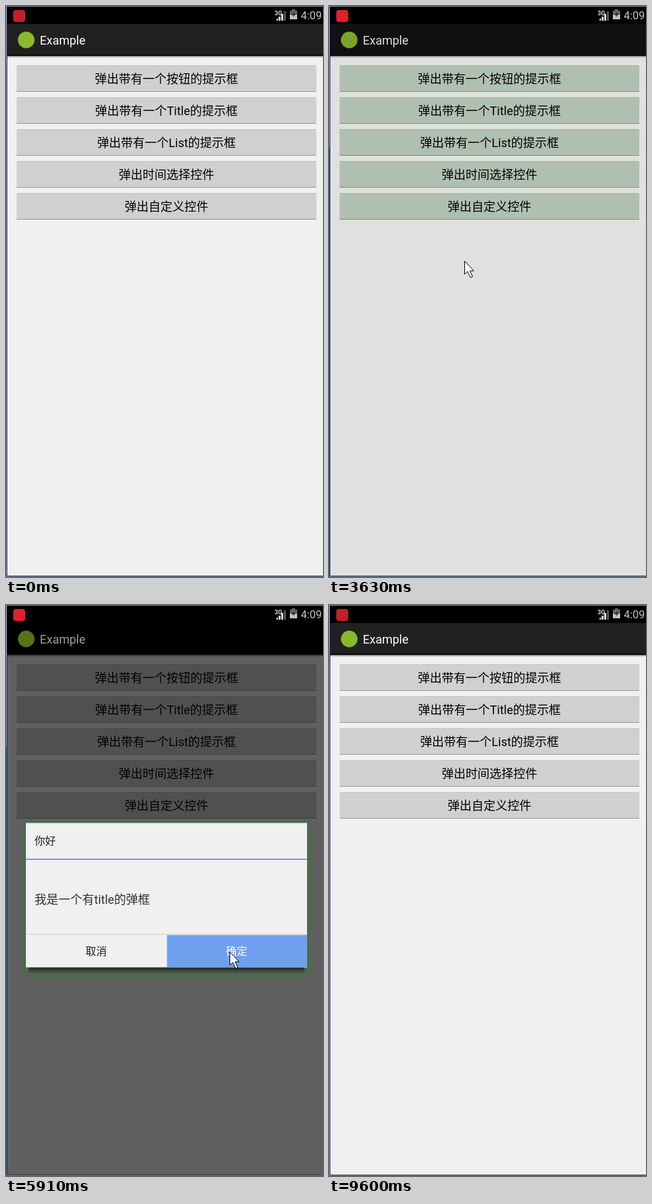
An HTML page that plays this animation: 478x858 px, repeating every 9.65 s.

```html
<!DOCTYPE html>
<html lang="zh-CN">
<head>
<meta charset="utf-8">
<style>
html, body { margin: 0; width: 100%; height: 100%; overflow: hidden; background: #000 }
svg { display: block; width: 478px; height: 858px; font: 18px Roboto, "Noto Sans CJK SC", "Noto Sans CJK", sans-serif }
.mid { text-anchor: middle }
.small { font-size: 16px }
</style>
</head>
<body>
<svg viewBox="0 0 478 858">
  <defs>
    <linearGradient id="shade" x2="0" y2="1">
      <stop stop-opacity=".65"/><stop offset="1" stop-opacity="0"/>
    </linearGradient>
  </defs>

  <rect id="page" x="2" y="75" width="476" height="781"/>
  <rect x="2" y="75" width="476" height="3" fill="url(#shade)" opacity=".7"/>
  <g id="buttons"></g>

  <!-- action bar -->
  <rect id="bar" x="2" y="27" width="476" height="46"/>
  <path d="M2 73h476v2H2z" fill="#0c0606"/>
  <g id="brand">
    <circle cx="30.5" cy="51" r="12.5" fill="#8aba2c"/>
    <text x="51" y="58" fill="#fff">Example</text>
  </g>

  <!-- status bar -->
  <path d="M2 1h476v26H2z"/>
  <rect id="badge" x="11" y="6" width="18" height="18" rx="4"/>
  <text x="405" y="14" font-size="9" font-weight="700" fill="#ddd">3G</text>
  <path d="M408 19h2v3h-2zM411 16h3v6h-3zM415 12h3v10h-3z" fill="#ddd"/>
  <path d="M419 8h3v14h-3z" fill="#555"/>
  <path d="M431 5h5v2h3v13h-11V7h3z" fill="#666"/>
  <path d="M428 13h11v7h-11z" fill="#c4c4c4"/>
  <path d="M436 8l-6 6h4l-2 4 5-6h-3z" fill="#222"/>
  <text x="444.5" y="20" font-size="16.5" fill="#c4c4c4">4:09</text>

  <!-- window edge -->
  <path d="M0 0h478v1H0z" fill="#7893b3"/>
  <path d="M0 0h1v858H0z" fill="#8fadcb"/>
  <path d="M1 1h1v857H1zM1 856h477v1H1z" fill="#1c2c50"/>
  <path d="M1 857h477v1H1z" fill="#8090a8"/>
  <path id="edge" d="M0 213h1v645H0z" fill="#3868b0"/>

  <g id="dialog">
    <rect id="halo" x="24" y="322" width="437" height="241" rx="14"/>
    <rect x="34" y="544" width="416" height="10" rx="4" fill="url(#shade)"/>
    <path d="M30 327.5h424v217H30z" fill="#f0f0f0"/>
    <path d="M30 381h424v2H30z" fill="#6f9fe8"/>
    <path d="M30 494h424v1.5H30zM242 496h1v48h-1z" fill="#d8d8d8"/>
    <text class="small" x="43" y="360" fill="#202020">你好</text>
    <text x="43" y="449" fill="#303030">我是一个有title的弹框</text>
    <rect id="cancelBg" x="30" y="496" width="212" height="48" fill="#6fa0f0"/>
    <rect id="okBg" x="243" y="496" width="211" height="48" fill="#6fa0f0"/>
    <text id="cancel" class="mid small" x="136" y="526">取消</text>
    <text id="ok" class="mid small" x="348" y="526">确定</text>
  </g>

  <g id="toast">
    <rect x="185" y="748" width="114" height="44" rx="22" fill="#606060"/>
    <text class="mid small" x="243" y="777" fill="#222">点击确定</text>
    <text class="mid small" x="242" y="776" fill="#fff">点击确定</text>
  </g>

  <path id="cursor" d="M.5 .5V20l4.5-4 4.3 9 3.2-1.5-4-8.5h6z" fill="#fff" stroke="#000"/>
</svg>
<script>
const LOOP = 9650;
const $ = id => document.getElementById(id);
const set = (id, name, value) => $(id).setAttribute(name, value);
const show = (id, on) => set(id, 'opacity', +on);

const labels = ['弹出带有一个按钮的提示框', '弹出带有一个Title的提示框', '弹出带有一个List的提示框', '弹出时间选择控件', '弹出自定义控件'];
$('buttons').innerHTML = labels.map((label, i) => `<g transform="translate(0 ${89 + 48 * i})">
  <rect x="16" width="452" height="40" rx="1.5"/>
  <path d="M16 0h452v1H16z" fill="#000" opacity=".06"/>
  <path d="M16 39h452v1H16z" fill="#000" opacity=".28"/>
  <text class="mid" x="242" y="27" fill="#000">${label}</text></g>`).join('');

// page, button, bar, halo, brand opacity
const shades = [
  ['#f0f0f0', '#d0d0d0', '#212121', '#e0e0e0', 1],
  ['#e0e0e0', '#b0c0b0', '#111', '#e0e0e0', .87],
  ['#d0e0d0', '#b0b0b0', '#111', '#d0d0d0', .85],
  ['#b0b0b0', '#909890', '#080808', '#a0a8a0', .78],
  ['#808080', '#707070', '#000', '#708070', .7],
  ['#606060', '#505050', '#000', '#506850', .62],
  ['#e0e0e0', '#d0d0d0', '#111', '#e0e0e0', 1]
];
// time, shade index
const dimming = [[0, 0], [1320, 1], [1420, 2], [1620, 3], [1720, 4], [1820, 5],
  [3420, 3], [3520, 2], [3620, 1], [4230, 6], [5120, 1], [5290, 2], [5380, 3], [5460, 4], [5540, 5],
  [5940, 4], [6050, 0]];
const toastFade = [[0, 0], [6480, .35], [6680, .7], [6880, 1], [7960, .8], [8060, .6], [8160, .4], [8260, .2], [8360, 0]];
// time, x, y of the pointer tip
const route = [[0, 500, 870], [100, 500, 870], [120, 463, 827], [920, 240, 161], [1060, 246, 164],
  [1520, 258, 206], [2120, 214, 353], [2620, 178, 467], [3020, 172, 521], [3420, 172, 521],
  [3920, 252, 175], [4120, 256, 168], [5120, 256, 168], [5320, 266, 230], [5720, 337, 515],
  [5820, 337, 521], [6220, 337, 521], [6420, 87, 700], [6440, -40, 780], [7960, -40, 540],
  [8300, 0, 565], [8500, 10, 600], [8700, -40, 640], [LOOP, -40, 640]];

const within = (t, from, to) => t >= from && t < to;
const latest = (steps, t) => steps.findLast(step => step[0] <= t)[1];

function pointerAt(t) {
  const i = route.findIndex(key => key[0] > t);
  const [t0, x0, y0] = route[i - 1], [t1, x1, y1] = route[i];
  const k = (t - t0) / (t1 - t0);
  return [x0 + (x1 - x0) * k, y0 + (y1 - y0) * k].map(Math.round);
}

function press(id, on, color) {
  show(id + 'Bg', on);
  set(id, 'fill', on ? '#fff' : color);
}

function draw(now) {
  const t = now % LOOP;
  const [page, button, bar, halo, brand] = shades[latest(dimming, t)];
  set('page', 'fill', page);
  set('buttons', 'fill', button);
  set('bar', 'fill', bar);
  set('halo', 'fill', halo);
  set('brand', 'opacity', brand);

  const later = within(t, 1160, 9600);
  set('badge', 'fill', later && t < 6050 ? '#e02030' : '#c02028');
  show('edge', later);

  show('dialog', within(t, 1420, 3420) || within(t, 5120, 5940));
  press('cancel', within(t, 3220, 3420), '#202020');
  press('ok', within(t, 5820, 5940), '#4f85de');
  set('toast', 'opacity', latest(toastFade, t));

  // the pointer is sampled ten times a second
  const tick = Math.max(0, Math.floor((t - 20) / 100) * 100 + 20);
  set('cursor', 'transform', `translate(${pointerAt(tick)})`);
  requestAnimationFrame(() => draw(performance.now()));
}
draw(performance.now());
</script>
</body>
</html>
```
